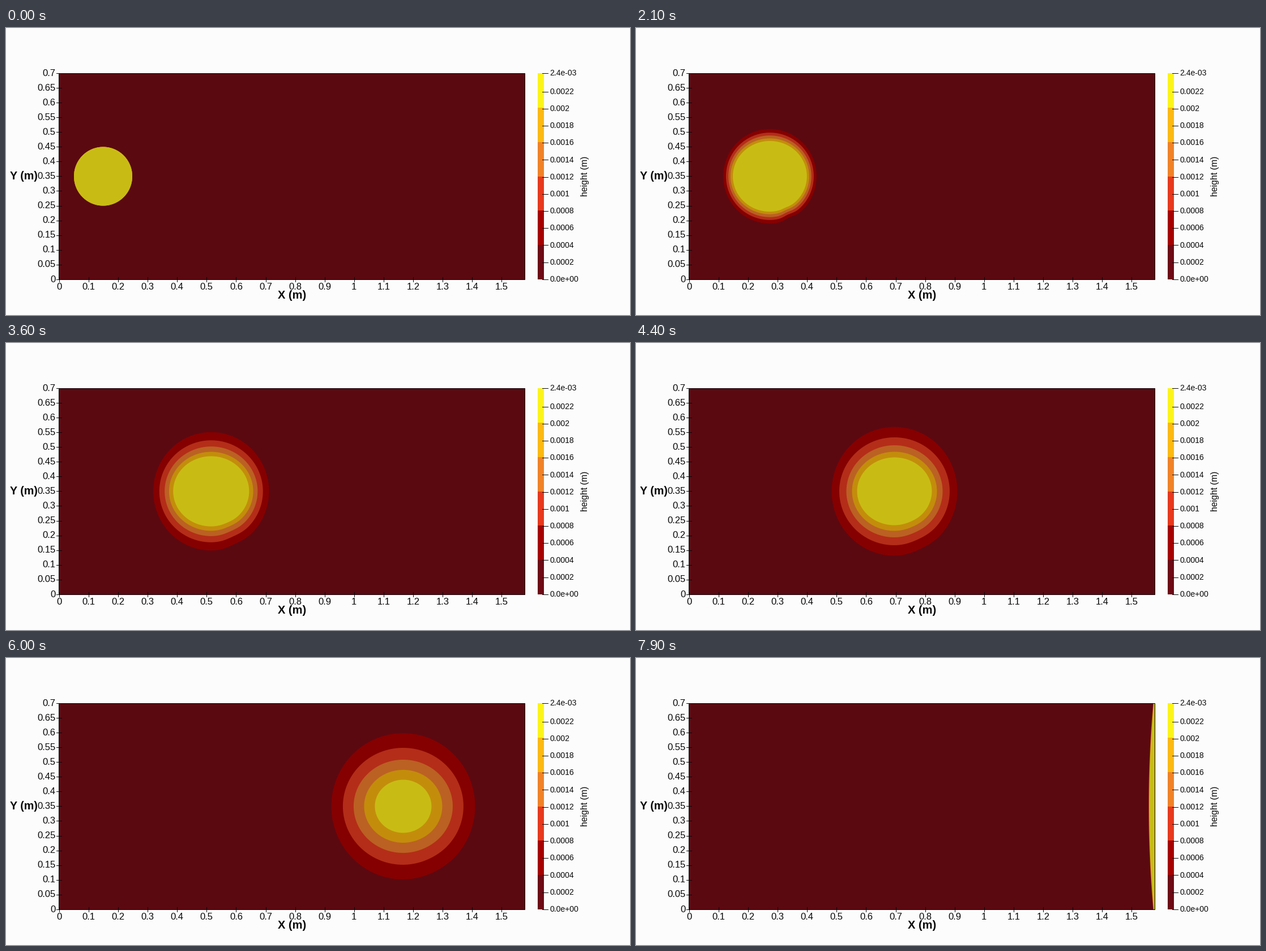
Animation of 1102x508 px, one loop 8 s. Source, as a matplotlib script:

```python
import numpy as np
import matplotlib.pyplot as plt
from matplotlib.animation import FuncAnimation
from matplotlib.patches import Polygon, Rectangle

W, H, DPI = 1102, 508, 100
FRAMES, STEP = 80, 100
LEFT, RIGHT, TOP, BOTTOM = 93.3, 916.4, 80, 444.8
MID = 262.5
INK = "#080808"
BAR = ["#6d0a15", "#a60000", "#e6391d", "#f08228", "#fbb912", "#fbf41a"]
FIELD = ["#5a0911", "#850000", "#b42d18", "#bb6123", "#c38d0b", "#c8bc14"]

# Half-widths and half-heights of each height contour at the key times
KEYS = np.array([0, 1.3, 2.8, 4.4, 6.0, 7.1])
RX = [[51.5, 70, 92.5, 111, 127, 139],
      [51.5, 68.5, 84.5, 97.5, 106.5, 108.5],
      [51.5, 66.5, 78, 85, 87.5, 80],
      [51.5, 65, 72, 75, 69, 40],
      [51.5, 63, 66, 66, 50, -22]]
RY = [[52, 70.5, 94.5, 114, 129.5, 139.5],
      [52, 68.5, 84, 95.5, 103.5, 106],
      [52, 66.5, 76, 81.5, 82.5, 78.5],
      [52, 64, 68.5, 70, 64.5, 47.5],
      [52, 61, 62.5, 60, 47, -22]]
THETA = np.linspace(0, 2 * np.pi, 361)
DENT_ANGLE = np.radians(65)


def radius(values, t):
    """Smooth interpolation of the signed squared radius, zero once it is gone."""
    v = np.array(values, float)
    v = v * np.abs(v)
    slope = np.gradient(v, KEYS)
    if t >= KEYS[-1]:
        sq = v[-1] + slope[-1] * (t - KEYS[-1])
    else:
        i = np.searchsorted(KEYS, t, side="right") - 1
        h = KEYS[i + 1] - KEYS[i]
        s = (t - KEYS[i]) / h
        sq = ((2 * s**3 - 3 * s**2 + 1) * v[i] + (s**3 - 2 * s**2 + s) * h * slope[i]
              + (3 * s**2 - 2 * s**3) * v[i + 1] + (s**3 - s**2) * h * slope[i + 1])
    return np.sqrt(max(sq, 0))


def contour(level, t):
    cx = 171.5 + 14.72 * t**2
    amp = np.interp(t, KEYS, [0, 0.045, 0.027, 0.015, 0.005, 0])
    width = np.interp(t, KEYS, [0.1, 0.14, 0.18, 0.24, 0.3, 0.3])
    amp *= 1 - 0.12 * level
    r = 1 - amp * np.exp(-((THETA - DENT_ANGLE) / width) ** 2)
    return np.column_stack([cx + radius(RX[level], t) * r * np.cos(THETA),
                            MID + radius(RY[level], t) * r * np.sin(THETA)])


def pile(t, extra):
    """Liquid gathering along the right wall."""
    times = [6.4, 6.7, 7.1, 7.9]
    peak = np.interp(t, times, [-1.5, 3, 6.7, 10.4])
    drop = np.interp(t, times, [6, 6, 6.2, 8])
    y = np.linspace(TOP, BOTTOM, 120)
    u = (y - MID) / 182.5
    depth = np.clip(peak + extra - drop * u**2, 0, None)
    x = np.append(RIGHT - depth, [RIGHT, RIGHT])
    return np.column_stack([x, np.append(y, [BOTTOM, TOP])])


fig = plt.figure(figsize=(W / DPI, H / DPI), dpi=DPI, facecolor="#fcfcfd")
ax = fig.add_axes([0, 0, 1, 1])
ax.set_xlim(0, W)
ax.set_ylim(H, 0)
ax.axis("off")


def label(x, y, text, px, ha="center", weight="normal"):
    ax.text(x, y + 0.345 * px, text, fontsize=px * 72 / DPI, ha=ha, va="baseline",
            color=INK, family="Liberation Sans", weight=weight, zorder=6)


def tick(x0, y0, x1, y1):
    ax.plot([x0, x1], [y0, y1], color=INK, lw=0.72, zorder=5)


def box(x, y, w, h, **kw):
    return ax.add_patch(Rectangle((x, y), w, h, **kw))


field = box(LEFT, TOP, RIGHT - LEFT, BOTTOM - TOP, fc=FIELD[0], ec="none")
box(LEFT, TOP, RIGHT - LEFT, BOTTOM - TOP, fc="none", ec="#100306", lw=0.72, zorder=4)

for k in range(15):
    y = BOTTOM - k * (BOTTOM - TOP) / 14
    tick(89, y, 97.5, y)
    label(87.8, y - 1, f"{k * 0.05:.2f}".rstrip("0").rstrip(".") if k else "0", 16.6, "right")
for k in range(16):
    x = 93.8 + 52.1 * k
    tick(x, 441, x, 449)
    label(x, 457.7, f"{k / 10:g}", 16.6)
label(505, 472.5, "X (m)", 20, weight="bold")
label(31, 261.5, "Y (m)", 19.8, weight="bold")

band = (445 - TOP) / 6
for k, color in enumerate(BAR):
    box(938.5, 445 - (k + 1) * band, 11.5, band, fc=color, ec="none")
for k in range(13):
    y = TOP if k == 12 else 444.7 - 30.2 * k
    tick(947, y, 957, y)
    text = {0: "0.0e+00", 12: "2.4e-03"}.get(k, f"{k * 0.0002:g}")
    label(960.3, y - 0.5, text, 14, "left")
ax.text(1023, 262, "height (m)", fontsize=15.8 * 72 / DPI, rotation=90, ha="center",
        va="center", color=INK, family="Liberation Sans")


def shape(color, z):
    p = Polygon([[0, 0], [0, 0], [0, 0]], closed=True, fc=color, ec="none", zorder=z)
    ax.add_patch(p)
    p.set_clip_path(field)
    return p


rings = [shape(c, 2 + 0.1 * i) for i, c in enumerate(FIELD[1:])]
piles = [(shape(FIELD[2], 3), 0.8), (shape(FIELD[5], 3.1), 0.0)]


def draw(n):
    t = n * STEP / 1000
    for i, ring in enumerate(rings):
        ring.set_xy(contour(i, t))
    for patch, extra in piles:
        patch.set_xy(pile(t, extra))
    return rings + [p for p, _ in piles]


anim = FuncAnimation(fig, draw, frames=FRAMES, interval=STEP, repeat=True,
                     repeat_delay=0, blit=False)
plt.show()
```
